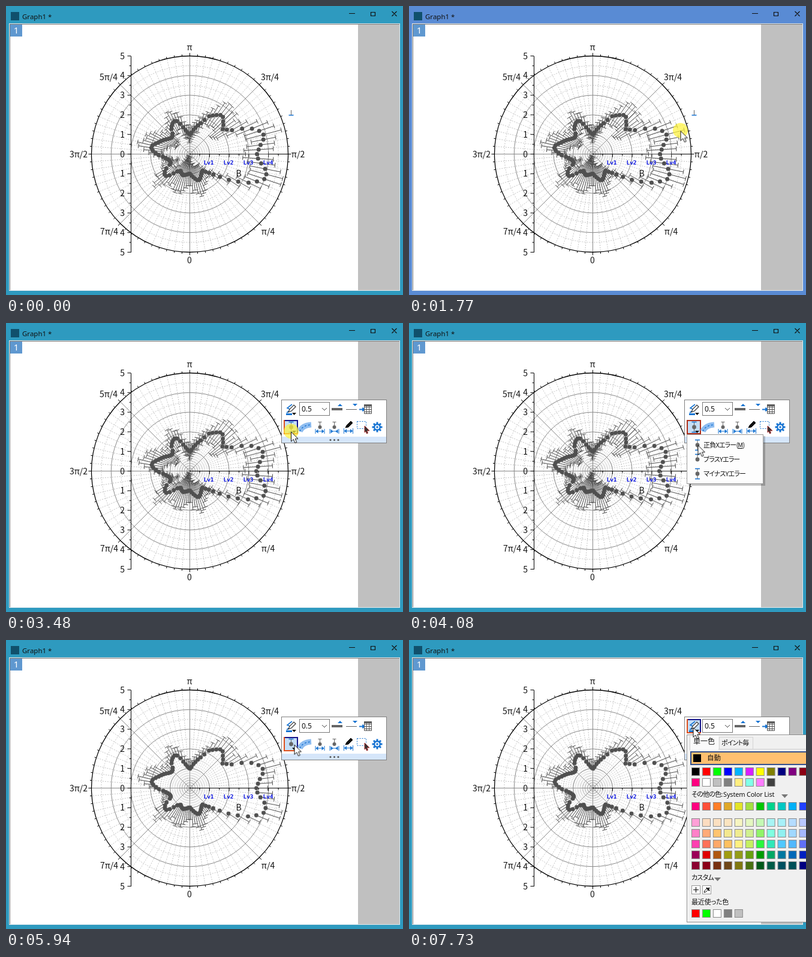
Animation, 662 px wide and 483 px high, one loop 8 s. Source, as an HTML page:

```html
<!DOCTYPE html>
<html lang="ja">
<head>
<meta charset="utf-8">
<title>Polar plot error bars</title>
<style>
html, body { margin: 0; width: 100%; height: 100%; overflow: hidden; }
svg { display: block; width: 662px; height: 483px; }
text { font-family: "Noto Sans CJK JP", "Noto Sans CJK", sans-serif; fill: #111; }
.ui { font-size: 11px; font-feature-settings: "palt"; letter-spacing: -.8px; }
.latin { font-family: "Noto Sans", "Open Sans", sans-serif; }
.lv { font: bold 9.5px "DejaVu Sans Mono", monospace; fill: #0a14e0; }
.num { font-size: 14px; }

.step { animation: 8s step-end infinite; }
#frame { fill: #2e9abf; animation-name: frame; }
#data { transform-origin: 306.5px 247.5px; animation-name: settle; }
#minus { animation-name: minus; }
#bar { animation-name: bar; }
#hotLow { animation-name: hotLow; }
#hotTop { animation-name: hotTop; }
#pressed { animation-name: menu; }
#foot { animation-name: minus; }
#menu { animation-name: menu; }
#palette { animation-name: palette; }
#click1 { animation-name: click1; }
#click2 { animation-name: click2; }
#click3 { animation-name: click3; }
#cursor { animation: move 8s linear infinite; }
.glow { fill: #fff23c; fill-opacity: .72; }

@keyframes frame { 0% { fill: #2e9abf; } 22.1% { fill: #598bd4; } 23%, 100% { fill: #2e9abf; } }
@keyframes settle { 0% { transform: scale(1); } 23%, 100% { transform: scale(.99); } }
@keyframes minus { 0% { visibility: visible; } 63.72%, 100% { visibility: hidden; } }
@keyframes bar { 0% { visibility: hidden; } 28.85%, 100% { visibility: visible; } }
@keyframes hotLow { 0% { visibility: hidden; } 39.3% { visibility: visible; } 77%, 100% { visibility: hidden; } }
@keyframes hotTop { 0% { visibility: hidden; } 79.2% { visibility: visible; } 82% { visibility: hidden; } 88.2%, 100% { visibility: visible; } }
@keyframes menu { 0% { visibility: hidden; } 45% { visibility: visible; } 61.85%, 100% { visibility: hidden; } }
@keyframes palette { 0% { visibility: hidden; } 93.22%, 100% { visibility: visible; } }
@keyframes click1 { 0% { visibility: hidden; } 22.1% { visibility: visible; } 23%, 100% { visibility: hidden; } }
@keyframes click2 { 0% { visibility: hidden; } 43.48% { visibility: visible; } 45%, 100% { visibility: hidden; } }
@keyframes click3 { 0% { visibility: hidden; } 60.1% { visibility: visible; } 61.85%, 100% { visibility: hidden; } }
@keyframes move {
  0%, .86% { transform: translate(700px, 500px); }
  .87% { transform: translate(622px, 466px); }
  5% { transform: translate(500px, 330px); }
  8.5% { transform: translate(434px, 240px); }
  10.3% { transform: translate(452px, 215px); }
  11.1%, 13.7% { transform: translate(452px, 214px); }
  14.5%, 16.3% { transform: translate(452.5px, 209.5px); }
  16.38%, 34.7% { transform: translate(452.5px, 208.5px); }
  40.25%, 48.5% { transform: translate(475px, 181.5px); }
  54.4%, 71.1% { transform: translate(490px, 234px); }
  74.2% { transform: translate(480.5px, 175px); }
  80.25%, 81.2% { transform: translate(476px, 146px); }
  85% { transform: translate(594px, 170px); }
  88.7%, 90.6% { transform: translate(473.5px, 142.5px); }
  91.2%, 100% { transform: translate(473.5px, 146px); }
}
</style>
</head>
<body>
<svg id="stage" viewBox="0 0 662 483" xmlns="http://www.w3.org/2000/svg"></svg>
<script>
const CX = 306.5, CY = 247.5, R = 164, UNIT = R / 5;
const BLUE = '#1874d2', GRAY = '#666';

const rect = (x, y, w, h, fill, stroke = 'none', extra = '') =>
  `<rect x="${x}" y="${y}" width="${w}" height="${h}" fill="${fill}" stroke="${stroke}" ${extra}/>`;
const path = (d, stroke, width = 1, fill = 'none', extra = '') =>
  `<path d="${d}" stroke="${stroke}" stroke-width="${width}" fill="${fill}" ${extra}/>`;
const text = (x, y, s, cls = '', extra = '') => `<text x="${x}" y="${y}" class="${cls}" ${extra}>${s}</text>`;
const dot = (x, y, r, fill) => `<circle cx="${x}" cy="${y}" r="${r}" fill="${fill}"/>`;
const group = (id, body) => `<g id="${id}" class="step">${body}</g>`;
const range = n => [...Array(n).keys()];

// screen point at angle a (radians, counterclockwise from the right)
const polar = (a, r) => [CX + r * Math.cos(a), CY - r * Math.sin(a)].map(v => v.toFixed(2));
const ray = (a, r0, r1) => `M${polar(a, r0)}L${polar(a, r1)}`;

function windowFrame() {
  return `<rect id="frame" class="step" width="662" height="483"/>` +
    rect(5.5, 29.5, 651, 446, '#fff', '#e4eaee') +
    path('M6 30.5H656M6.5 30V475', '#777') +
    rect(587, 31, 69, 444, '#c0c0c0') +
    rect(7, 31, 20, 20, '#5f98d0') +
    text(17, 46, '1', 'latin', 'text-anchor="middle" font-size="15" style="fill:#fff"') +
    rect(8, 10, 14, 14, '#10506c') +
    text(27, 22, 'Graph1 *', 'latin', 'font-size="11.5"') +
    path('M572 12.5H582M608.5 10.5H615.5V16.5H608.5ZM643.5 9L651.5 17M651.5 9L643.5 17', '#111', 1.2);
}

function grid() {
  let major = '', minor = '', ticks = '';
  for (const i of range(80)) {
    const a = i * Math.PI / 40, main = i % 10 === 0;
    if (main) major += ray(a, 0, R);
    else minor += ray(a, 0, R);
    ticks += ray(a, R, R + (main ? 5 : 3));
  }
  const rings = range(9).map(i => {
    const main = i % 2;
    return `<circle cx="${CX}" cy="${CY}" r="${(i + 1) * UNIT / 2}" fill="none" stroke="${main ? '#888' : '#c4c4c4'}" ${main ? '' : 'stroke-dasharray="2 2"'}/>`;
  }).join('');
  return path(minor, '#c4c4c4', 1, 'none', 'stroke-dasharray="2 2"') + rings + path(major, '#888') +
    `<circle cx="${CX}" cy="${CY}" r="${R}" fill="none" stroke="#000" stroke-width="1.3"/>` + path(ticks, '#000');
}

function axes() {
  let d = 'M208.5 84V412', labels = '', bottom = `M${CX} ${CY}H470`;
  for (const i of range(21)) {
    const y = 83.5 + i * UNIT / 2;
    d += `M208.5 ${y}h${i % 2 ? -3 : -6}`;
    if (i % 2 === 0) labels += text(198, y + 5, Math.abs(5 - i / 2), 'num', 'text-anchor="end"');
  }
  for (const i of range(10)) bottom += `M${CX + (i + 1) * UNIT / 2} ${CY}v${i % 2 ? 5 : 3}`;
  const around = [['0', 306, 425], ['π/4', 437, 377], ['π/2', 487, 248], ['3π/4', 440, 119],
    ['π', 306, 69], ['5π/4', 171, 119], ['3π/2', 121, 248], ['7π/4', 172, 377]];
  labels += around.map(([s, x, y]) => text(x, y + 5, s, 'num', 'text-anchor="middle"')).join('');
  return path(d + bottom, '#000') + labels;
}

const radii = [112, 115, 119, 125, 127, 122, 112, 97, 81, 74, 69, 74, 78, 83, 83, 79, 75, 71, 62, 55,
  50, 45, 41, 36, 33, 34, 37, 41, 46, 53, 59, 61, 59, 56, 52, 45, 42, 41, 42, 44,
  47, 50, 53, 56, 60, 64, 65, 62, 57, 52, 45, 41, 38, 36, 35, 35, 38, 46, 51, 54,
  54, 49, 42, 36, 34, 32, 34, 36, 37, 36, 35, 34, 33, 33, 36, 39, 42, 45, 46, 44,
  41, 38, 36, 35, 40, 45, 52, 63, 78, 93, 109, 121, 131, 132, 128, 120, 114];
// typical error length every 15 degrees
const spread = [28, 30, 33, 30, 22, 14, 14, 20, 20, 14, 24, 28, 8, 8, 20, 26, 28, 32, 28, 32, 20, 10, 22, 30];

function series() {
  let seed = 11, plus = '', minus = '', dots = '';
  const random = () => (seed = seed * 16807 % 2147483647) / 2147483647;
  const whisker = (a, r0, r1) => {
    const [x, y] = polar(a, r1).map(Number), s = 4 * Math.sin(a), c = 4 * Math.cos(a);
    return ray(a, r0, r1) + `M${(x - s).toFixed(1)} ${(y - c).toFixed(1)}L${(x + s).toFixed(1)} ${(y + c).toFixed(1)}`;
  };
  radii.forEach((r, i) => {
    const t = i / radii.length, a = t * 2 * Math.PI, p = t * 24, k = Math.floor(p);
    const mid = spread[k] + (spread[(k + 1) % 24] - spread[k]) * (p - k);
    const e = mid * (.68 + .4 * random());
    plus += whisker(a, r, r + e);
    minus += whisker(a, r, Math.max(2, r - e));
    const [x, y] = polar(a, r);
    dots += dot(x, y, 3.5, '#505050');
  });
  return group('data', path(plus, '#484848') + group('minus', path(minus, '#484848')) + dots);
}

function plotLabels() {
  return range(4).map(i => text(338 + i * 33, 265, 'Lv' + (i + 1), 'lv', 'text-anchor="middle"')).join('') +
    text(388, 285, 'B', 'num', 'text-anchor="middle"');
}

// error bar glyph; the foot can be added separately
const head = (x, y) => path(`M${x - 4} ${y - 8.5}h8`, BLUE, 1.6) + path(`M${x} ${y - 8}V${y}`, GRAY) + dot(x, y, 3.4, GRAY);
const foot = (x, y) => path(`M${x - 4} ${y + 8.5}h8`, BLUE, 1.6) + path(`M${x} ${y}v8`, GRAY);
const caret = (x, y) => path(`M${x - 3.5} ${y}h7l-3.5 4z`, 'none', 0, '#111');
const arrow = (x, y, dir) => path(`M${x} ${y}l${-4 * dir} -3.5v7z`, 'none', 0, BLUE);
const pencil = (x, y) => path(`M${x} ${y}l2 -5l7 -7l3 3l-7 7z`, '#333', 1.2, '#fff');

function hotButton(id, y) {
  return group(id, rect(463, y, 24, 24, '#c5def6') +
    path(`M463 ${y + 1}H486V${y + 24}`, '#15158a', 2) + path(`M464 ${y}V${y + 23}H487`, '#e0501c', 2));
}

function spanIcon(x, outward) {
  const y = 181, d = outward ? 1 : -1, e = outward ? 7 : 2;
  return path(`M${x - 3} 165.5h6M${x} 166V177`, GRAY) + dot(x, 174, 3, GRAY) +
    path(`M${x - 6} ${y}h12M${x - 7.5} 177v8M${x + 7.5} 177v8`, BLUE) + arrow(x - e, y, -d) + arrow(x + e, y, d);
}

function toolbar() {
  const gear = range(8).map(i => `M619 174L${619 + 8.5 * Math.cos(i * Math.PI / 4)} ${174 + 8.5 * Math.sin(i * Math.PI / 4)}`).join('');
  const top = path('M477 136l-8 6l6 3l-7 5', BLUE, 1.6) + pencil(471, 149) +
    rect(467, 151, 10, 3, BLUE) + caret(480.5, 150) +
    rect(489.5, 132.5, 50, 22, '#fff', '#777') + text(493, 148, '0.5', 'latin', 'font-size="12"') +
    path('M527 142l4 4l4 -4', '#444') +
    rect(543, 142, 18, 4, '#666') + path('M553 139h8l-4 -4z', 'none', 0, BLUE) +
    path('M567 144.5h18', '#666') + path('M578 135h8l-4 4z', 'none', 0, BLUE) +
    path('M589 144.5h6', BLUE, 2) + arrow(599, 144.5, 1) +
    path('M597.5 136.5h12v15h-12zM597 140.5h13M597 144.5h13M597 148.5h13M601.5 137v15M605.5 137v15', '#555', 1, '#fff') +
    rect(597, 136, 13, 3, '#555') + arrow(598, 144.5, 1);
  const low = head(475.5, 174) + group('foot', foot(475.5, 174)) + caret(480.5, 180) +
    path('M490 181Q494 171 509 170', '#8fbdf0', 9) + path('M490 181Q494 171 509 170', BLUE, 1.4, 'none', 'stroke-dasharray="3 3"') +
    spanIcon(523.5, true) + spanIcon(547.5, false) +
    path('M566 175l2 -4l7 -7l3 3l-7 7z', '#111', 1, '#111') +
    path('M564 180.5h14M563.5 176v9M578.5 176v9', BLUE) + arrow(564, 180.5, -1) + arrow(578, 180.5, 1) +
    rect(585.5, 164.5, 15, 12, 'none', BLUE, 'stroke-dasharray="2 2"') +
    path('M598 172l8 8l-4 0l1.5 4l-2 1l-1.5 -4l-2 2z', '#a33', 1, '#333') +
    path(gear, BLUE, 3) + dot(619, 174, 6, BLUE) + dot(619, 174, 3.6, '#fff') + dot(619, 174, 1.8, BLUE);
  return group('bar', rect(459.5, 128.5, 175, 72, '#fff', '#808080') + rect(460, 190, 174, 10, '#d5e6fa') +
    [541, 547.5, 554].map(x => dot(x, 195.5, 1.5, '#555')).join('') +
    hotButton('hotLow', 162) + hotButton('hotTop', 132) +
    group('pressed', rect(464, 163, 22, 22, 'none', '#b0301a', 'stroke-width="2"')) + top + low);
}

function menu() {
  const items = ['正負Xエラー(<tspan text-decoration="underline">M</tspan>)', 'プラスYエラー', 'マイナスYエラー'];
  return group('menu', rect(466, 189, 128, 83, '#000', 'none', 'opacity=".22"') +
    rect(463.5, 186.5, 127, 82, '#fdfdfd', '#9a9a9a') +
    items.map((s, i) => {
      const y = 204 + i * 24;
      return head(481, y) + (i === 1 ? '' : foot(481, y)) + text(491, y + 4, s, 'ui');
    }).join(''));
}

const swatches = [
  [220, '000 f00 0f0 00f 00b4ff d81fff ff0 808000 000080 800080 8b0014'],
  [238, 'ff0080 fff c0c0c0 808080 ffee80 80ffe8 ff7cff 404040'],
  [278, 'ff0080 ff5038 ff7e28 e0a828 e4e428 a4e040 00c800 00d48c 00c8c4 00b0f8 2040ff'],
  [305, 'ff9fd6 fbdcc0 fbdfc0 fbe4c0 f6f4c0 e4f6c0 c4f8b4 a8f4f4 a8f0f8 b4dcff b8c8ff'],
  [323, 'ff80c8 ffab78 ffc470 f4e890 f0ec90 d0f090 90f468 80ffe0 90f0f0 a0d8ff a4b8ff'],
  [341, 'ff40b0 ff7058 ffa868 ffc060 fff080 c4f060 28f83c 30e8b8 50c8ff 50b8ff 6070f8'],
  [359, '9c0058 e00000 b05810 a09c10 949c18 68a010 009c00 00a864 0078a0 0068b8 0020c0'],
  [377, '8c0030 8c0018 783010 704818 807810 487010 005818 005c48 005060 005058 000080'],
  [457, 'f00 0f0 fff 808080 c0c0c0']
];

function palette() {
  const cells = swatches.map(([y, row]) => row.split(' ').map((c, i) =>
    rect((471.5 + i * 17.95).toFixed(1), y - 6.5, 13, 13, '#' + c, '#8a8a8a')).join('')).join('');
  const drop = (x, y) => path(`M${x - 5} ${y}h11l-5.5 6z`, 'none', 0, '#777');
  return group('palette', rect(463.5, 158.5, 210, 313, '#f0f0f0', '#8a8a8a') +
    path('M464.5 471V159.5H662', '#fff') +
    rect(469, 160, 47, 24, '#fafafa') + rect(517.5, 162.5, 56, 20, '#f0f0f0', '#d4d4d4') +
    path('M516 182.5H662M468.5 184V160', '#d0d0d0') +
    text(474, 174, '単一色', '', 'font-size="12"') + text(521, 176, 'ポイント毎', 'ui') +
    rect(470, 187, 210, 21, '#ffc070', '#34508c', 'stroke-width="2"') + rect(474, 191, 13, 13, '#000') +
    text(497, 201, '自動', '', 'font-size="11.5"') + cells +
    text(471, 262, 'その他の色: <tspan class="latin" letter-spacing="-.2">System Color List</tspan>', 'ui') + drop(626, 258) +
    text(471, 401, 'カスタム', 'ui') + drop(514, 397) +
    rect(471.5, 410.5, 14, 14, '#fff', '#999') + path('M478.5 413v9M474 417.5h9', '#111', 1.2) +
    rect(489.5, 410.5, 14, 14, '#fff', '#999') + path('M492 422l1 -3l4 -4l2 2l-4 4z', '#111') +
    path('M496 414l5 5M498 417l3 -3', '#111', 2.4) +
    text(471, 442, '最近使った色', 'ui', 'style="letter-spacing:-.2px"'));
}

const glow = (id, x, y) => `<circle id="${id}" class="step glow" cx="${x}" cy="${y}" r="12.5"/>`;
const cursor = `<g id="cursor">${path('M.5 .5V16.5L4.3 13L7 19L9.8 17.8L7.2 12H12Z', '#111', 1, '#fff')}</g>`;

document.getElementById('stage').innerHTML = windowFrame() + grid() + axes() + series() + plotLabels() +
  toolbar() + menu() + palette() +
  glow('click1', 452.5, 208) + glow('click2', 475.5, 181) + glow('click3', 488.5, 233) + cursor;
</script>
</body>
</html>
```
